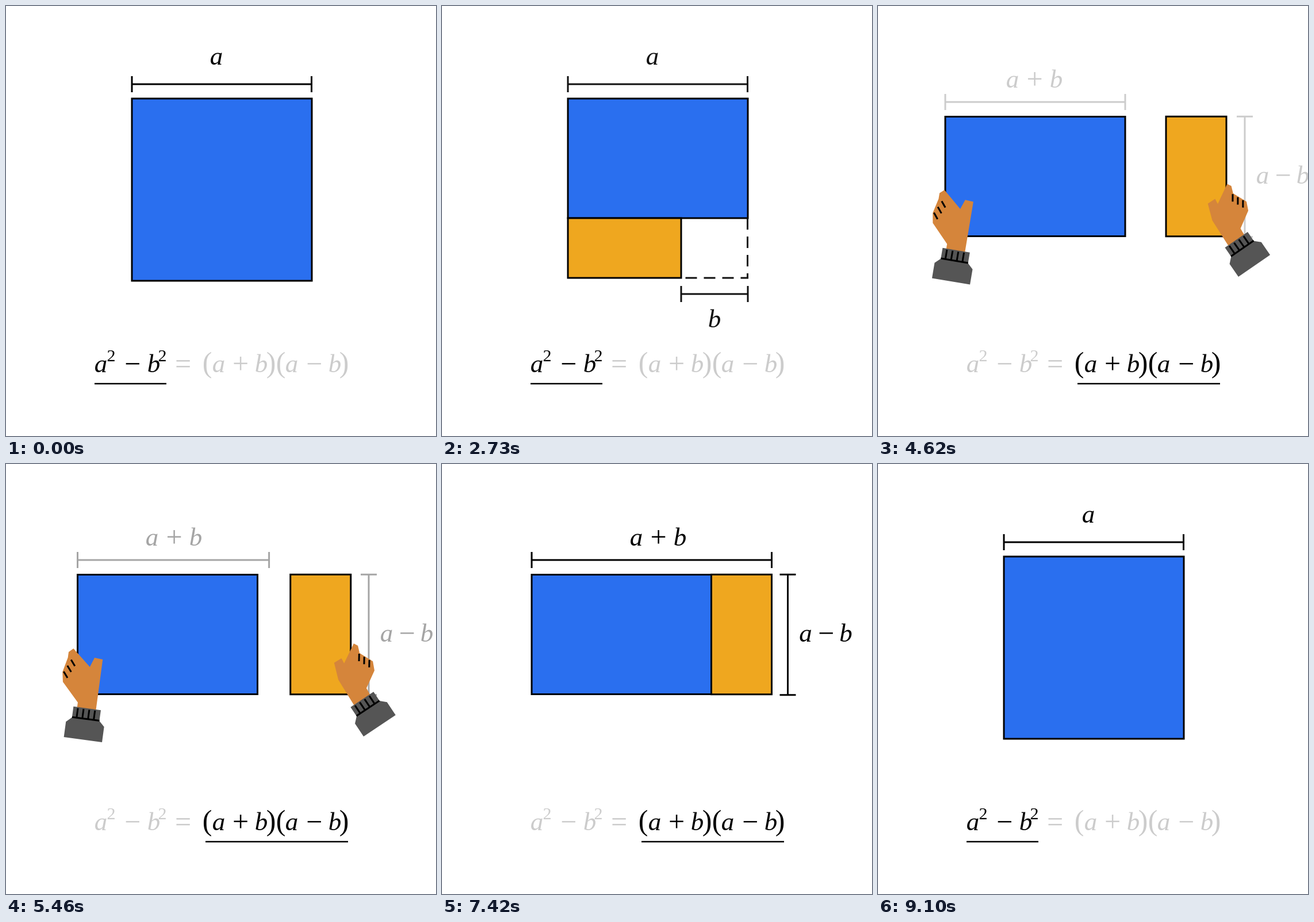
An HTML page with a canvas for the animation above (9.87 s loop, 748 by 748 pixels).

```html
<!DOCTYPE html>
<html lang="en">
<head>
<meta charset="utf-8">
<title>Difference of two squares</title>
<style>
html, body { margin: 0; height: 100%; overflow: hidden; background: #fff; }
canvas { display: block; width: 100vw; height: 100vh; }
</style>
</head>
<body>
<canvas id="stage" width="748" height="748"></canvas>
<script>
const ctx = document.getElementById('stage').getContext('2d');
const LOOP = 9870, STEP = 70;
const BLUE = '#2a6fef', ORANGE = '#efa71f', SKIN = '#d5853b', SLEEVE = '#555', INK = '#000';

// x, y, size, colour, tilt in degrees
const CONFETTI = [
  [122, 56, 13, BLUE, 0], [414, 63, 9, ORANGE, -8], [517, 110, 11, ORANGE, 8],
  [652, 74, 7, BLUE, 5], [46, 245, 8, ORANGE, 0], [677, 332, 9, BLUE, 5],
  [303, 457, 19, ORANGE, -6], [168, 540, 8, BLUE, -5], [465, 532, 8, ORANGE, 0],
  [635, 533, 22, BLUE, 6]
];

// Hands are drawn relative to the middle of the sleeve's lower edge.
const LEFT_HAND = {
  shape: [-45, -148, -37.5, -155, -5, -127, 1, -144, 15.5, -143, 15.5, -54, -17.5, -54,
    -17.5, -63, -48, -95, -51, -112, -45, -138],
  crease: [-39, -135, -31, -125], next: [-5, 11]
};
const RIGHT_HAND = {
  shape: [-5, -135, 10, -134.5, 9, -124.7, 42, -144, 46, -137, 41.3, -124.5, 52.4, -99.7,
    46, -85, 17.2, -67, 16.2, -54, -17.2, -53, -15.3, -106.4],
  crease: [40, -124, 32.6, -113.4], next: [4.4, 9.4]
};

const mix = (a, b, k) => a + (b - a) * k;
const rad = deg => deg * Math.PI / 180;
const linear = (t, from, to) => Math.min(1, Math.max(0, (t - from) / (to - from)));
const ease = (t, from, to) => {
  const p = linear(t, from, to);
  return p < .5 ? 4 * p ** 3 : 1 - 4 * (1 - p) ** 3;
};
const shade = k => {
  const v = Math.round(204 * k);
  return `rgb(${v},${v},${v})`;
};

function at(x, y, deg, alpha, draw) {
  if (alpha <= 0) return;
  ctx.save();
  ctx.translate(x, y);
  ctx.rotate(rad(deg));
  ctx.globalAlpha *= alpha;
  draw();
  ctx.restore();
}

function trace(points) {
  ctx.beginPath();
  for (let i = 0; i < points.length; i += 2) ctx.lineTo(points[i], points[i + 1]);
}

function polygon(points, fill) {
  trace(points);
  ctx.fillStyle = fill;
  ctx.fill();
}

function line(points, color = INK, width = 3) {
  trace(points);
  ctx.strokeStyle = color;
  ctx.lineWidth = width;
  ctx.stroke();
}

function box(x, y, w, h, fill) {
  ctx.fillStyle = fill;
  ctx.fillRect(x, y, w, h);
  ctx.strokeStyle = INK;
  ctx.lineWidth = 3;
  ctx.strokeRect(x, y, w, h);
}

function bracket(x, y, length, deg, color, alpha = 1) {
  const r = length / 2;
  at(x, y, deg, alpha, () => {
    line([-r, 0, r, 0], color);
    for (const end of [-r, r]) line([end, -14, end, 14], color);
  });
}

function glyph(char, x, y, color, alpha = 1) {
  const letter = /[ab]/.test(char), digit = char === '2';
  const size = letter ? 45 : digit ? 30 : 50;
  ctx.font = `${letter ? 'italic ' : ''}${size}px "Liberation Serif", serif`;
  ctx.fillStyle = color;
  at(x, y + (/[+−=]/.test(char) ? 2 : digit ? -19 : 0), 0, alpha, () => ctx.fillText(char, 0, 0));
}

function glyphs(text, xs, y, color) {
  [...text].forEach((char, i) => glyph(char, xs[i], y, color));
}

function hand({ shape, crease, next }, tilt) {
  ctx.rotate(rad(tilt));
  polygon(shape, SKIN);
  const [x1, y1, x2, y2] = crease;
  for (let i = 0; i < 3; i++) {
    const dx = i * next[0], dy = i * next[1];
    line([x1 + dx, y1 + dy, x2 + dx, y2 + dy]);
  }
  polygon([-33.5, 0, -33.5, -27, -24, -36, -24, -55, 24, -55, 24, -36, 33.5, -27, 33.5, 0], SLEEVE);
  line([-24, -36.5, 24, -36.5]);
  for (const x of [-16, -6, 4, 14]) line([x, -53, x, -37]);
}

function cutSquare(cut) {
  box(219, 161, 313, mix(317, 312, cut), BLUE);
  at(0, 0, 0, cut, () => {
    polygon([416, 369, 534, 369, 534, 480, 416, 480], '#fff');
    line([416, 474.5, 416, 369, 533.5, 369]);
  });
}

function equation(swap) {
  const left = shade(swap), right = shade(1 - swap);
  glyphs('a2−b2', [165, 183, 220, 257, 272], 637, left);
  glyph('=', 308, 637, shade(1));
  glyphs('(a+b)(a−b)', [350, 370, 408, 444, 461, 478, 497, 536, 572, 588], 637, right);
  line([mix(154, 347, swap), 657, mix(279, 595, swap), 657], INK, 2.5);
}

function render(t) {
  const cut = ease(t, 700, 1190), tint = ease(t, 1330, 1820);
  const dim = linear(t, 2660, 3570), enter = ease(t, 2660, 3570);
  const move = ease(t, 3640, 4340), join = ease(t, 5180, 5950);
  const burst = 1 - (1 - linear(t, 5740, 6230)) ** 3, leave = ease(t, 6230, 7210);
  const reset = ease(t, 8400, 9100);
  const swap = move - reset, stay = 1 - reset;
  const color = shade(dim * (1 - join));

  // Follows a value through its square, apart and joined places, and back.
  const path = (start, apart, joined) =>
    mix(mix(mix(start, apart, move), joined, join), start, reset);

  ctx.fillStyle = '#fff';
  ctx.fillRect(0, 0, 748, 748);
  ctx.textAlign = 'center';

  for (const [x, y, size, fill, tilt] of CONFETTI) {
    at(mix(365, x, burst), mix(297, y, burst) + 100 * leave, tilt + 60 * leave,
      burst > 0 ? 1 - leave : 0, () => {
        const s = size * burst;
        ctx.fillStyle = fill;
        ctx.fillRect(-s / 2, -s / 2, s, s);
      });
  }

  // Dimensions and their labels
  const x1 = path(219, 117, 156), x2 = path(531.5, 430, 573.5);
  bracket((x1 + x2) / 2, path(136, 167, 167), x2 - x1, 0, color);
  const ax = path(366, 234, 338), ay = path(102, 142, 142);
  glyph('a', ax, ay, color);
  glyph('+', ax + 38.5, ay, color, swap);
  glyph('b', ax + 76, ay, color, swap);

  const slide = -36.5 * join;
  bracket(mix(474, 638, move) + slide, mix(501, 297, move), mix(116, 209.5, move),
    -90 * move, color, tint * stay);
  const bx = mix(474, 739, move) + slide, by = mix(559, 309, move);
  glyph('b', bx, by, color, tint * stay);
  glyph('−', bx - 34.5, by, color, swap);
  glyph('a', bx - 70, by, color, swap);

  // Pieces
  if (tint < 1) cutSquare(cut);
  at(0, 0, 0, cut * (1 - move), () => {
    ctx.setLineDash([20, 12]);
    line([531.5, 369, 531.5, 473, 416, 473], color);
  });
  const top = path(161, 192.5, 192.5);
  at(x1, top, 0, tint, () => box(0, 0, 313, mix(208, 317, reset), BLUE));

  const ox = mix(317.5, 553.5, move) - 32.5 * join, oy = mix(421, 296.5, move);
  const turn = 90 * move, w = mix(197, 208.5, move), h = mix(104, 105, move);
  at(ox, oy, turn, tint * stay, () => box(-w / 2, -h / 2, w, h, ORANGE));

  equation(swap);

  if (enter > 0 && leave < 1) {
    const away = 1 - enter;
    at(x1 + mix(10, 6.5, join) - 220 * leave, top + mix(286.5, 289.5, join) + 480 * away + 110 * leave,
      9.5 * (1 - join) - 15 * leave, 1, () => hand(LEFT_HAND, 0));
    at(ox + 430 * away + 220 * leave, oy - 100 * away + 110 * leave, turn - 90, 1, () => {
      ctx.translate(mix(101, 109.5, join), mix(155.5, 173, join));
      hand(RIGHT_HAND, -30 - 4.6 * (1 - join) + 15 * leave);
    });
  }
}

function tick(now) {
  render(Math.floor(now % LOOP / STEP) * STEP);
  requestAnimationFrame(tick);
}
requestAnimationFrame(tick);
</script>
</body>
</html>
```
